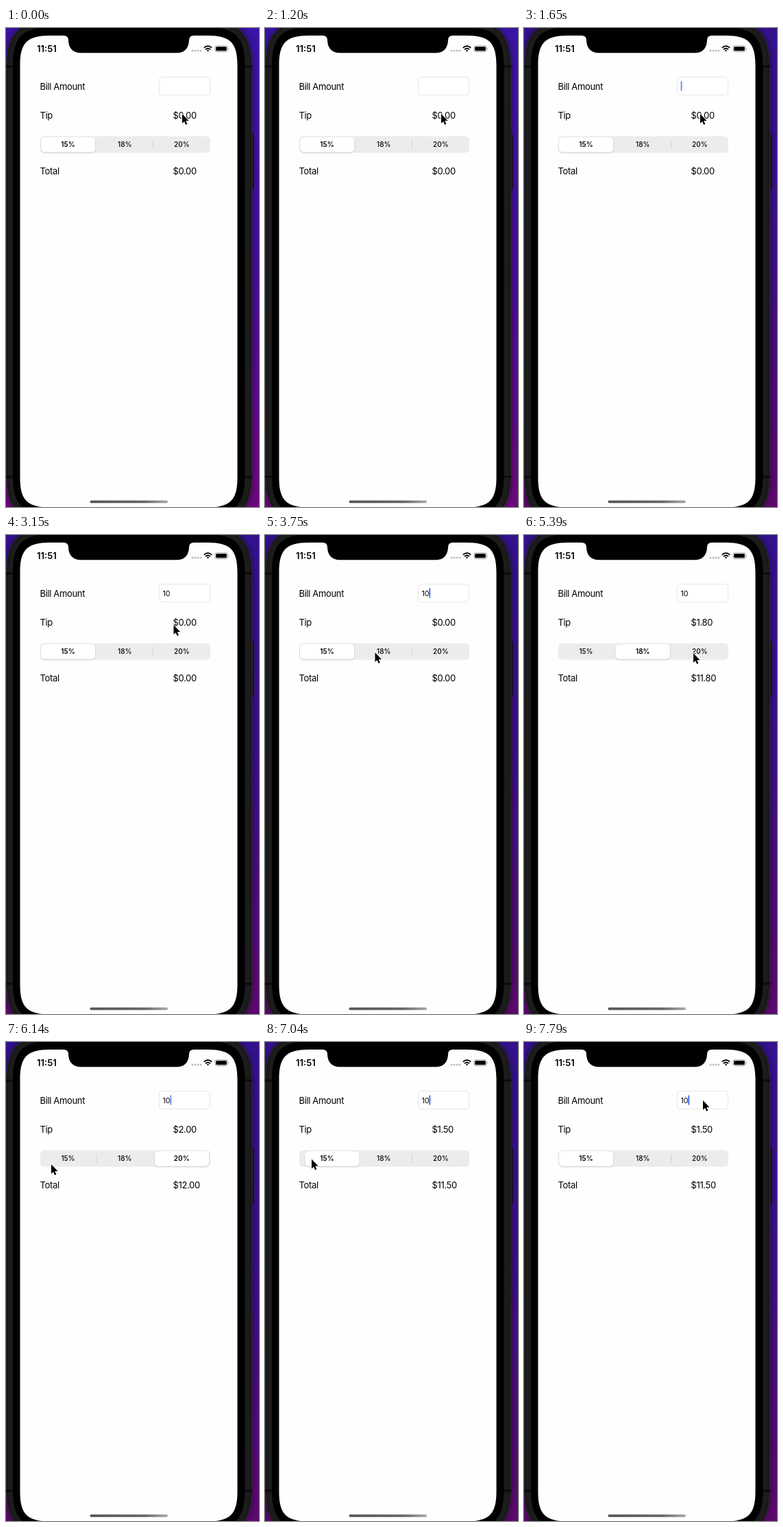
An HTML page for the animation above (8000 ms loop, 369 by 697 pixels).

```html
<!DOCTYPE html>
<html lang="en">
<head>
<meta charset="utf-8">
<title>Tip calculator</title>
<style>
  html, body { margin: 0; width: 100%; height: 100%; overflow: hidden; background: #000; }
  svg { display: block; width: 369px; height: 697px; }
  text { font-family: Inter, Roboto, sans-serif; fill: #000; }
  .body { font-size: 13px; letter-spacing: -.35px; }
  .seg { font-size: 10px; text-anchor: middle; font-weight: 500; }
</style>
</head>
<body>
<svg viewBox="0 0 369 697">
  <defs>
    <linearGradient id="desk" x1="0" y1="0" x2="0" y2="1">
      <stop id="deskTop" offset="0"/>
      <stop id="deskMid" offset=".5"/>
      <stop id="deskEnd" offset="1"/>
    </linearGradient>
    <linearGradient id="home">
      <stop offset="0" stop-color="#555"/>
      <stop offset=".7" stop-color="#666"/>
      <stop offset="1" stop-color="#aaa"/>
    </linearGradient>
    <filter id="soft" x="-20%" y="-40%" width="140%" height="200%">
      <feDropShadow dx="0" dy="1" stdDeviation="1" flood-opacity=".2"/>
    </filter>
    <filter id="halo" x="-10%" y="-10%" width="120%" height="120%">
      <feGaussianBlur stdDeviation="4"/>
    </filter>
  </defs>

  <rect width="369" height="697" fill="url(#desk)"/>

  <!-- phone -->
  <path id="shade" opacity=".5" filter="url(#halo)"/>
  <rect x="356" y="155" width="5" height="80" rx="1.5" fill="#1b1b1d" stroke="#0c0c0e"/>
  <path id="shell" fill="#1c1c1d" stroke="#2a2a2c"/>
  <path id="groove" fill="none" stroke="#121213"/>
  <path d="M0 56H10M348 56H359M0 653H10M348 653H359" stroke="#0b0b0c" stroke-width="3"/>
  <path id="bezel"/>
  <path id="screen" fill="#fefefe"/>
  <path d="M84 10V11Q91 11 91 18C91.500 30 98 36.200 109 36.200H249C260 36.200 266.500 30 267 18Q267 11 274 11V10Z"/>
  <rect x="122.500" y="687.500" width="113.500" height="3.700" rx="1.800" fill="url(#home)"/>

  <!-- status bar -->
  <text x="45" y="34.600" font-size="13.100" font-weight="600">11:51</text>
  <g fill="#bdbdbd">
    <circle cx="272" cy="33" r="1.500"/><circle cx="276" cy="33" r="1.500"/>
    <circle cx="280" cy="33" r="1.500"/><circle cx="284" cy="33" r="1.500"/>
  </g>
  <g fill="none" stroke="#000" stroke-width="1.800">
    <path d="M288.800 28.800Q294.500 23.700 300.200 28.800M291 31.200Q294.500 28.200 298 31.200"/>
    <path d="M294.500 34.500L292.700 32.600Q294.500 31.200 296.300 32.600Z" fill="#000" stroke="none"/>
  </g>
  <rect x="304.900" y="25.900" width="18.200" height="8.700" rx="2.500" fill="none" stroke="#8b8b8b" stroke-width=".8"/>
  <rect x="306.200" y="27.200" width="15.600" height="6.100" rx="1.400"/>
  <path d="M324 28.800Q325.600 30.200 324 31.700Z" fill="#8b8b8b"/>

  <!-- form -->
  <g class="body">
    <text x="49.500" y="89.800">Bill Amount</text>
    <text x="49.500" y="131.800">Tip</text>
    <text x="49.500" y="213.200">Total</text>
    <text id="tip" x="243.500" y="131.800"></text>
    <text id="total" x="243.500" y="213.200"></text>
  </g>
  <rect x="223.500" y="71.500" width="74" height="26" rx="4" fill="#fff" stroke="#e6e6e6"/>
  <text id="bill" x="228.500" y="88.600" font-size="10.700" letter-spacing="-.2"></text>
  <rect id="caret" y="77.500" width="1.800" height="14" rx=".6" fill="#3763e8"/>

  <!-- segmented control -->
  <rect x="50" y="157.500" width="248" height="24" rx="5.500" fill="#ececed"/>
  <path id="sep0" d="M132 163V176" stroke="#d2d2d4"/>
  <path id="sep1" d="M214.500 163V176" stroke="#d2d2d4"/>
  <rect id="thumb" y="159" width="79" height="21.500" rx="5" fill="#fff" filter="url(#soft)"/>
  <g class="seg" id="labels">
    <text x="90.500" y="173.200">15%</text>
    <text x="173.300" y="173.200">18%</text>
    <text x="256.300" y="173.200">20%</text>
  </g>

  <path id="mouse" d="M0 0V13.700L3.100 10.900L5.100 15.700L7.300 14.700L5.300 10H9.600Z"
        stroke="#fff" stroke-width="1.800" paint-order="stroke" stroke-linejoin="round"/>
</svg>

<script>
const $ = id => document.getElementById(id);
const LOOP = 8000, STEP = 150, SLIDE = 380;
const rates = [15, 18, 20];
const thumbX = [51, 133.8, 217];

const taps = [
  { at: 4230, seg: 1 },
  { at: 5470, seg: 2 },
  { at: 6745, seg: 0 }
];
const mousePath = [
  [3000, 257, 125], [3300, 232, 137], [3600, 157, 174], [3750, 160.5, 171],
  [4050, 165, 171], [4790, 165, 171], [5240, 246, 172], [5540, 248, 172],
  [6140, 66, 178], [6440, 66, 178], [6740, 68, 170.5], [7040, 68, 170.5],
  [7340, 222, 103], [7490, 243, 94], [7640, 257, 87], [7790, 261, 85]
];
const firstBlink = [
  [0, 0], [299, 0], [300, 1], [750, 1], [900, .6], [1050, .1],
  [1200, 0], [1350, .5], [1500, .5], [1650, .8], [1800, .8], [1950, 0]
];

// Box with continuous corners: longer and flatter than a plain arc.
function smoothBox(id, x, y, w, h, r) {
  const far = r * 1.35, near = far * .243, c = far - near;
  const across = w - 2 * far, down = h - 2 * far;
  $(id).setAttribute("d", `M${x + far} ${y}h${across}
    c${c} 0 ${far} ${near} ${far} ${far}v${down}
    c0 ${c} ${-near} ${far} ${-far} ${far}h${-across}
    c${-c} 0 ${-far} ${-near} ${-far} ${-far}v${-down}
    c0 ${-c} ${near} ${-far} ${far} ${-far}z`);
}

function hold(t) {
  const base = t < 4640 ? 0 : 4640;
  return Math.min(7790, base + Math.floor((t - base) / STEP) * STEP);
}

// Linear interpolation over rows of [time, ...values].
function along(keys, t) {
  const i = keys.findIndex(k => k[0] > t);
  if (i === 0) return keys[0].slice(1);
  if (i < 0) return keys[keys.length - 1].slice(1);
  const a = keys[i - 1], b = keys[i];
  const p = (t - a[0]) / (b[0] - a[0]);
  return a.slice(1).map((v, n) => v + (b[n + 1] - v) * p);
}

const clamp = v => Math.max(0, Math.min(1, v));
const ease = p => p < .5 ? 4 * p ** 3 : 1 - 4 * (1 - p) ** 3;
const money = v => "$" + v.toFixed(2);

function caretAlpha(t) {
  if (t < 2250) return along(firstBlink, t)[0];
  if (t < 2700) return 1;
  const p = (t - 2700) % 1050;
  return p < 550 ? clamp((400 - p) / 150) : clamp((p - 700) / 150);
}

function setDesk(top, mid, end) {
  $("deskTop").setAttribute("stop-color", top);
  $("deskMid").setAttribute("stop-color", mid);
  $("deskEnd").setAttribute("stop-color", end);
}

function draw(time) {
  const t = hold(time);
  if (t < 1650) setDesk("#3a14a4", "#470e98", "#6c0a7c");
  else setDesk("#33128c", "#3d0f84", "#5c0a6c");

  const typed = t < 2250 ? "" : t < 2700 ? "1" : "10";
  $("bill").textContent = typed;
  $("caret").setAttribute("x", [228.7, 233.6, 239.4][typed.length]);
  $("caret").setAttribute("opacity", caretAlpha(t));

  let seg = 0, x = thumbX[0], bill = 0;
  for (const tap of taps) {
    if (t < tap.at) break;
    x += (thumbX[tap.seg] - x) * ease(clamp((t - tap.at) / SLIDE));
    seg = tap.seg;
    bill = 10;
  }
  $("thumb").setAttribute("x", x);
  $("sep0").setAttribute("opacity", seg === 2 ? 1 : 0);
  $("sep1").setAttribute("opacity", seg === 0 ? 1 : 0);
  [...$("labels").children].forEach((label, i) => {
    label.style.fontWeight = i === seg ? 600 : 500;
  });

  const tip = bill * rates[seg] / 100;
  $("tip").textContent = money(tip);
  $("total").textContent = money(bill + tip);
  $("mouse").setAttribute("transform", `translate(${along(mousePath, t)})`);
}

smoothBox("shade", 0, -10, 359, 728, 52);
smoothBox("shell", .5, -10, 358, 728, 52);
smoothBox("groove", 2.5, -8, 354, 724, 50);
smoothBox("bezel", 10, -1, 338.5, 709, 42);
smoothBox("screen", 20.5, 11, 317, 686.5, 32);

const start = performance.now();
function tick() {
  draw((performance.now() - start) % LOOP);
  requestAnimationFrame(tick);
}
tick();
</script>
</body>
</html>
```
